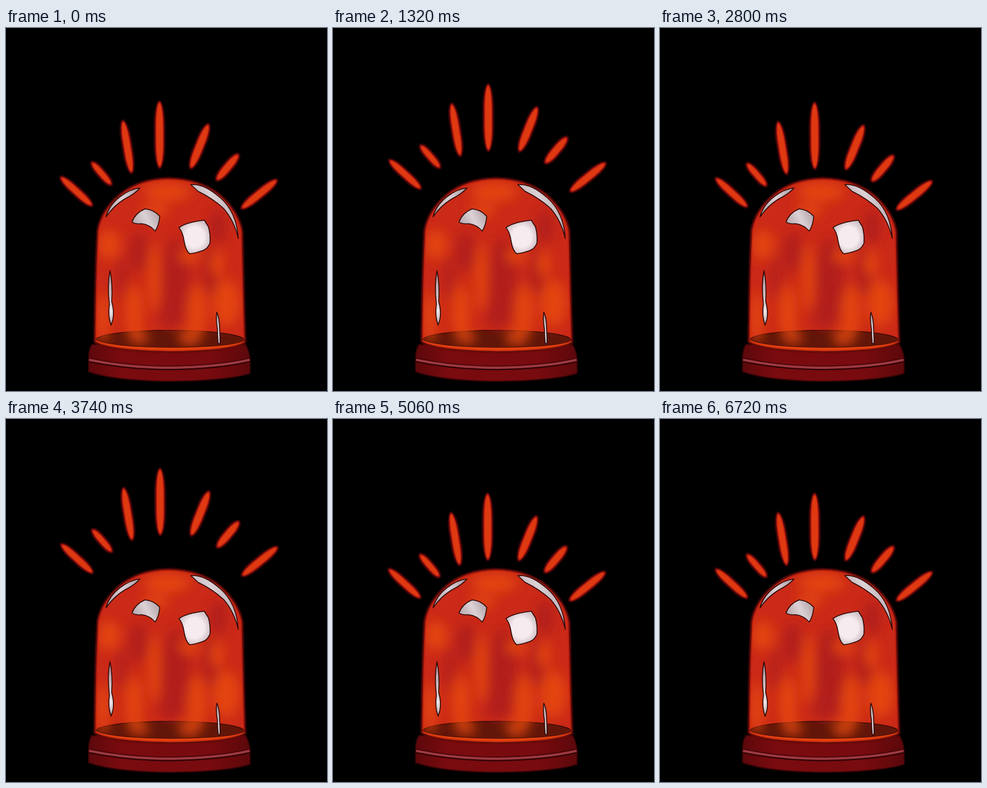
These frames come from a looping animation (568 px wide and 640 px high, 6.78 s). An HTML page:

```html
<!DOCTYPE html>
<html>
<head>
<meta charset="utf-8">
<style>
html, body { margin: 0; width: 100%; height: 100%; overflow: hidden; background: #000; }
svg { display: block; width: 568px; height: 640px; }
</style>
</head>
<body>
<svg viewBox="0 0 568 640">
  <defs>
    <filter id="soft" filterUnits="userSpaceOnUse" x="100" y="200" width="400" height="440"><feGaussianBlur stdDeviation="10"/></filter>
    <filter id="edge" filterUnits="userSpaceOnUse" x="0" y="0" width="568" height="640"><feGaussianBlur stdDeviation="1.2"/></filter>
    <filter id="fine" filterUnits="userSpaceOnUse" x="0" y="0" width="568" height="640"><feGaussianBlur stdDeviation=".6"/></filter>
    <linearGradient id="shine" x1="0" y1="0.6" x2="1" y2="0.2">
      <stop offset="0" stop-color="#b5a5aa"/><stop offset=".5" stop-color="#dcd2d6"/><stop offset="1" stop-color="#b09fa4"/>
    </linearGradient>
    <linearGradient id="sliver" x1="0" y1="0" x2="0" y2="1">
      <stop offset="0" stop-color="#a98f94"/><stop offset=".75" stop-color="#ebe2e5"/><stop offset="1" stop-color="#b7a4a9"/>
    </linearGradient>
    <radialGradient id="glint">
      <stop offset=".6" stop-color="#f6ebef"/><stop offset="1" stop-color="#d3c4c9"/>
    </radialGradient>
    <linearGradient id="ring" x1="0" x2="1" y1="0" y2="0">
      <stop offset="0" stop-color="#5c080b"/><stop offset=".2" stop-color="#7a0b0f"/><stop offset=".75" stop-color="#780b0f"/><stop offset="1" stop-color="#5c080b"/>
    </linearGradient>
    <path id="dome" d="M157 553 Q158 440 162 357 Q168 322 201 294 Q235 266 288 265 Q342 266 378 294 Q412 324 418 358 Q420 460 423 554 Q400 570 290 571 Q180 569 157 553Z"/>
    <clipPath id="inside"><use href="#dome"/></clipPath>
  </defs>

  <g id="rays" filter="url(#fine)"></g>

  <g stroke-linejoin="round" filter="url(#fine)">
    <path d="M152 558 Q146 567 146 582 L146 606 Q190 622 290 623 Q390 622 432 609 L432 583 Q430 568 424 558Z" fill="url(#ring)" stroke="#350405" stroke-width="2"/>
    <path d="M147 588 Q215 602 290 602 Q375 601 431 588" fill="none" stroke="#300304" stroke-width="3"/>
    <path d="M147 585 Q215 599 290 599 Q375 598 431 585" fill="none" stroke="#9c3942" stroke-width="4"/>
    <path d="M147 582 Q215 596 290 596 Q375 595 431 582" fill="none" stroke="#420507" stroke-width="1.3"/>
  </g>

  <use href="#dome" fill="none" stroke="#6c0a09" stroke-width="4" filter="url(#edge)"/>
  <use href="#dome" fill="#cb2a18"/>
  <g clip-path="url(#inside)">
    <ellipse cx="290" cy="550" rx="131" ry="17" fill="#62160a" stroke="#350705" stroke-width="1.5" filter="url(#fine)"/>
    <g id="blotches" filter="url(#soft)" opacity=".8"></g>
    <g fill="none" filter="url(#fine)">
      <path d="M157 553 Q185 567 290 567 Q400 567 424 554" stroke="#e5430f" stroke-width="7"/>
      <path d="M157 549 Q185 562 290 563 Q400 562 424 550" stroke="#541009" stroke-width="1"/>
    </g>
    <use href="#dome" fill="none" stroke="#a5170f" stroke-width="4" filter="url(#edge)"/>
  </g>
  <use href="#dome" fill="none" stroke="#4a0807" stroke-width="1.2" filter="url(#fine)"/>

  <g fill="url(#shine)" stroke="#2c0909" stroke-width="1.6" stroke-linejoin="round" filter="url(#fine)">
    <path d="M177 333 Q182 313 201 298 Q219 284 237 282 Q229 292 209 302 Q190 314 177 333Z"/>
    <path d="M327 276 Q351 274 380 300 Q408 325 411 371 Q404 340 385 318 Q365 300 340 288Z"/>
    <path d="M223 342 Q229 326 246 319 Q262 320 272 332 Q271 347 264 358 Q255 347 240 345 Q228 346 223 342Z"/>
    <path d="M306 352 Q320 342 351 339 Q354 344 358 350 Q362 363 361 379 Q357 389 349 392 Q336 397 325 398 Q318 393 315 375 Q313 360 306 352Z" fill="url(#glint)"/>
    <path d="M184 428 Q189 450 187 482 Q192 500 189 514 L186 524 Q180 508 183 487 Q179 453 184 428Z" fill="url(#sliver)"/>
    <path d="M373 501 Q378 512 378 530 L379 555 Q376 560 375 553 L374 530 Q371 514 373 501Z" fill="url(#sliver)"/>
  </g>
</svg>
<script>
const $ = id => document.getElementById(id);
const oval = (x, y, rx, ry, fill) =>
  `<ellipse cx="${x}" cy="${y}" rx="${rx}" ry="${ry}" fill="${fill}"/>`;
// A long blunt lens around the origin
const lens = (half, w, fill, extra = '') =>
  `<rect x="${-half}" y="${-w}" width="${2 * half}" height="${2 * w}" rx="${half * .75}" ry="${w}" fill="${fill}" ${extra}/>`;

// x1, y1, x2, y2, half width
$('rays').innerHTML = [
  [97, 263, 152, 313, 7], [152, 237, 186, 276, 6.5], [207, 164, 222, 255, 7.5],
  [271.5, 130, 272, 246, 8], [358, 170, 327, 247, 8], [411, 223, 373, 268, 7.5], [479, 268, 417, 318, 7.5]
].map(([x1, y1, x2, y2, w]) => {
  const half = Math.hypot(x2 - x1, y2 - y1) / 2;
  const turn = Math.atan2(y2 - y1, x2 - x1) * 180 / Math.PI;
  return `<g transform="translate(${(x1 + x2) / 2} ${(y1 + y2) / 2}) rotate(${turn})">` +
    lens(half + 3, w + 2.5, '#420607') +
    lens(half, w - .5, '#b81a12') +
    lens(half - 3, w - 2.5, '#de3910') + '</g>';
}).join('');

const orange = '#e84c0c', crimson = '#ac1a1c';
$('blotches').innerHTML = [
  [300, 450, 26, 80, crimson], [235, 395, 18, 35, crimson], [362, 430, 14, 45, crimson],
  [290, 505, 20, 25, crimson], [375, 350, 16, 30, crimson], [205, 440, 9, 40, crimson],
  [285, 289, 42, 17, orange], [264, 322, 24, 12, orange], [182, 382, 20, 26, orange],
  [390, 485, 24, 42, orange], [262, 440, 11, 60, orange], [226, 500, 16, 48, orange],
  [338, 500, 17, 48, orange], [325, 402, 20, 11, orange], [374, 415, 11, 24, orange],
  [172, 510, 12, 45, orange], [325, 545, 20, 15, orange], [235, 545, 18, 12, orange]
].map(b => oval(...b)).join('');

// Uneven frame pacing: step numbers reached at these times
const times = [0, 60, 760, 1460, 2140, 2860, 3600, 4280, 5000, 5680, 6360, 6780];
const steps = [0, 1, 12, 22, 33, 45, 56, 66, 78, 88, 98, 105];
// One double bounce of the rays
const poses = [[0, 0], [6, -88], [3, -30], [1, 0], [1, -42], [2, 2], [2, 2], [2, 2], [2, 2]];

function draw(now) {
  const t = now % 6780;
  const i = times.findLastIndex(v => v <= t);
  const part = (t - times[i]) / (times[i + 1] - times[i]);
  const step = Math.floor(steps[i] + part * (steps[i + 1] - steps[i]) + .15);
  $('rays').setAttribute('transform', `translate(${poses[step % 9]})`);
}

const start = performance.now();
function tick() {
  draw(performance.now() - start);
  requestAnimationFrame(tick);
}
tick();
</script>
</body>
</html>
```
